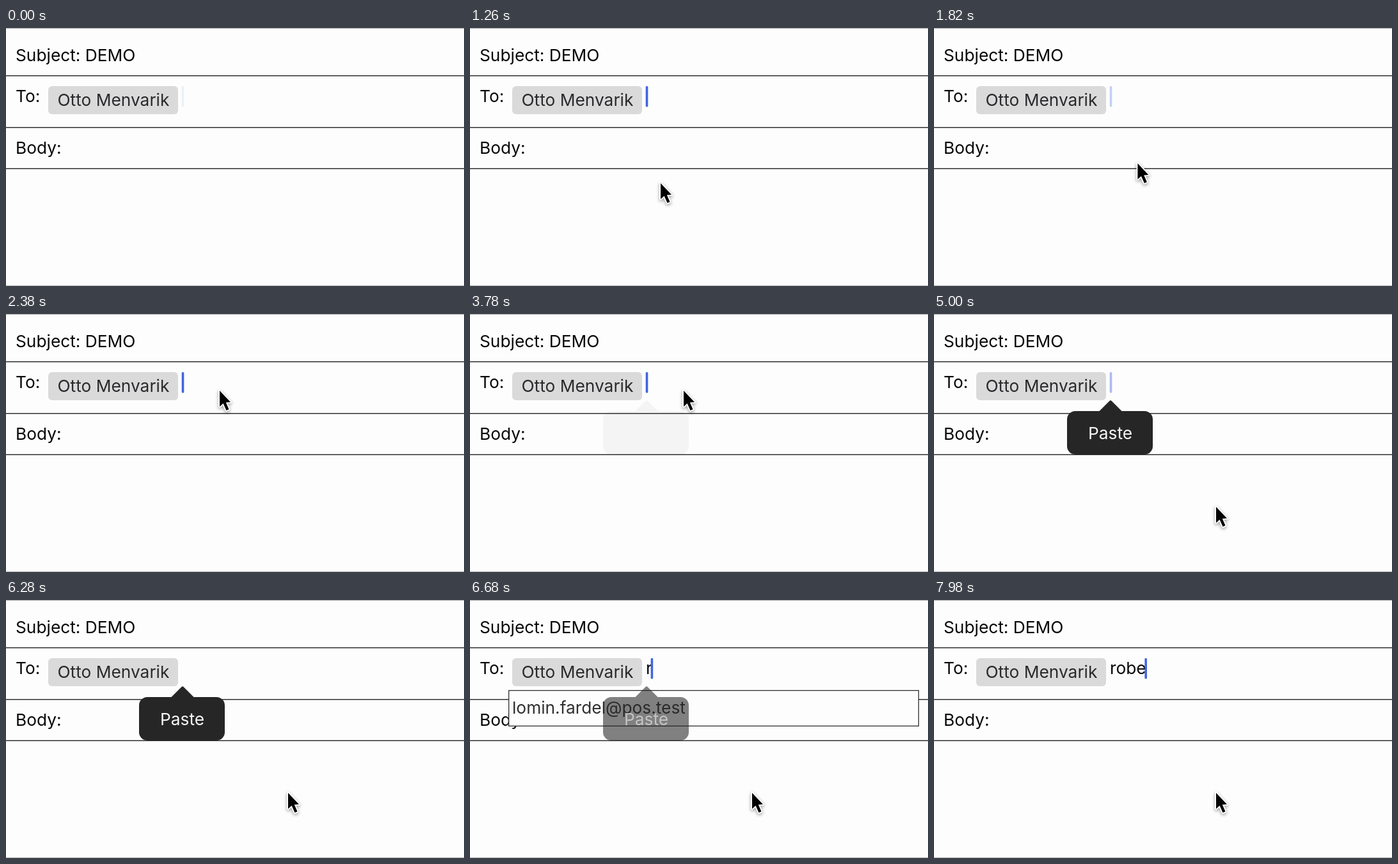
Write an HTML page with a canvas that moves like this. It is 716 by 404 pixels and loops after 8000 ms.

```html
<!DOCTYPE html>
<html lang="en">
<head>
<meta charset="utf-8">
<title>Recipient field</title>
<style>
  html, body { margin: 0; width: 100%; height: 100%; overflow: hidden; background: #fdfdfd; }
  canvas { display: block; width: 716px; height: 404px; }
</style>
</head>
<body>
<canvas id="stage" width="716" height="404"></canvas>
<script>
const ctx = document.getElementById('stage').getContext('2d');
const W = 716, H = 404, LOOP = 8000;
const PAPER = '#fdfdfd', INK = '#080808', LINE = '#303030';
const FONT = '26.3px Inter, "Liberation Sans", sans-serif';

const QUERY = 'robe', TYPE_START = 6520, KEY_GAP = 473;
const BLINK = 1060;
// Moments when input makes the caret solid again
const wakes = [140, 540, 1230, 3690, 4070, 4450,
  ...[...QUERY].map((_, i) => TYPE_START + i * KEY_GAP)];

const ramp = (t, from, to) => Math.min(1, Math.max(0, (t - from) / (to - from)));
const smooth = u => u * u * (3 - 2 * u);

// One blink: fade in, stay, fade out, rest
function caretAlpha(t) {
  const wake = wakes.reduce((last, w) => t >= w ? w : last);
  const phase = (t - wake + 150 + BLINK) % BLINK;
  return smooth(ramp(phase, -20, 150)) * (1 - ramp(phase, 550, 820));
}

function bubbleAlpha(t) {
  return ramp(t, 3771, 4030) * (1 - ramp(t, TYPE_START, TYPE_START + 380));
}

function pointerAt(t) {
  let x = 186, y = 404;
  const glide = (from, to, tx, ty) => {
    const u = smooth(ramp(t, from, to));
    x += (tx - x) * u;
    y += (ty - y) * u;
  };
  glide(940, 1240, 298, 243);
  glide(1320, 1660, 318, 214);
  glide(1780, 2240, 334, 120);
  glide(4040, 4480, 441, 302);
  return [x, y];
}

function rect(x, y, w, h, color) {
  ctx.fillStyle = color;
  ctx.fillRect(x, y, w, h);
}

function text(s, x, y, color = INK, align = 'left') {
  ctx.font = FONT;
  ctx.textAlign = align;
  ctx.fillStyle = color;
  ctx.fillText(s, x, y);
}

function roundRect(x, y, w, h, r, color) {
  ctx.beginPath();
  ctx.roundRect(x, y, w, h, r);
  ctx.fillStyle = color;
  ctx.fill();
}

function drawForm() {
  rect(0, 0, W, H, PAPER);
  rect(0, 0, W, 1, '#a8a8a8');
  rect(0, H - 1, W, 1, '#b4b4b4');
  for (const y of [74, 155, 219.5]) rect(0, y, W, 1.5, LINE);
  text('Subject: DEMO', 15, 52);
  text('To:', 15, 116);
  text('Body:', 15, 197);
  roundRect(66, 91, 203, 44, 6, '#dadadb');
  text('Otto Menvarik', 80.5, 122, '#2a2a2c');
}

function drawCaret(x, alpha) {
  ctx.globalAlpha = alpha;
  roundRect(x, 91, 3.6, 32.5, 1.5, '#4066e0');
  ctx.globalAlpha = 1;
}

function drawSuggestion() {
  rect(60, 141, 642, 57, LINE);
  rect(61.3, 142.3, 639.4, 54.4, PAPER);
  text('lomin.fardel@pos.test', 66, 178, '#303032');
}

function drawBubble(alpha) {
  if (!alpha) return;
  ctx.globalAlpha = alpha;
  ctx.fillStyle = '#262626';
  ctx.beginPath();
  ctx.roundRect(208, 152, 134, 68, 13);
  ctx.moveTo(258, 152.5);
  ctx.lineTo(274.5, 136);
  ctx.quadraticCurveTo(276, 134.5, 277.5, 136);
  ctx.lineTo(294, 152.5);
  ctx.closePath();
  ctx.fill();
  text('Paste', 275.5, 196, '#f6f6f6', 'center');
  ctx.globalAlpha = 1;
}

function drawPointer(x, y) {
  ctx.save();
  ctx.translate(x, y);
  ctx.beginPath();
  [[0, 0], [0, 25], [5.6, 20], [10.5, 31], [14.5, 29.3], [9.8, 18.5], [17, 18]]
    .forEach(([px, py]) => ctx.lineTo(px, py));
  ctx.closePath();
  ctx.lineJoin = 'round';
  ctx.lineWidth = 3.6;
  ctx.strokeStyle = '#fff';
  ctx.shadowColor = 'rgba(0,0,0,.4)';
  ctx.shadowBlur = 5;
  ctx.shadowOffsetY = 2;
  ctx.stroke();
  ctx.shadowColor = 'transparent';
  ctx.fillStyle = '#000';
  ctx.fill();
  ctx.restore();
}

function draw(t) {
  drawForm();
  const count = Math.max(0, Math.floor((t - TYPE_START) / KEY_GAP) + 1);
  const typed = QUERY.slice(0, count);
  text(typed, 275, 116);
  const shift = typed ? ctx.measureText(typed).width - 2 : 0;
  drawCaret(274.7 + shift, caretAlpha(t));
  if (count === 1) drawSuggestion();
  drawBubble(bubbleAlpha(t));
  if (t >= 420 && t < 520) drawPointer(184, 400);
  if (t >= 940) drawPointer(...pointerAt(t));
}

const start = performance.now();
function tick() {
  draw((performance.now() - start) % LOOP);
  requestAnimationFrame(tick);
}
tick();
</script>
</body>
</html>
```
